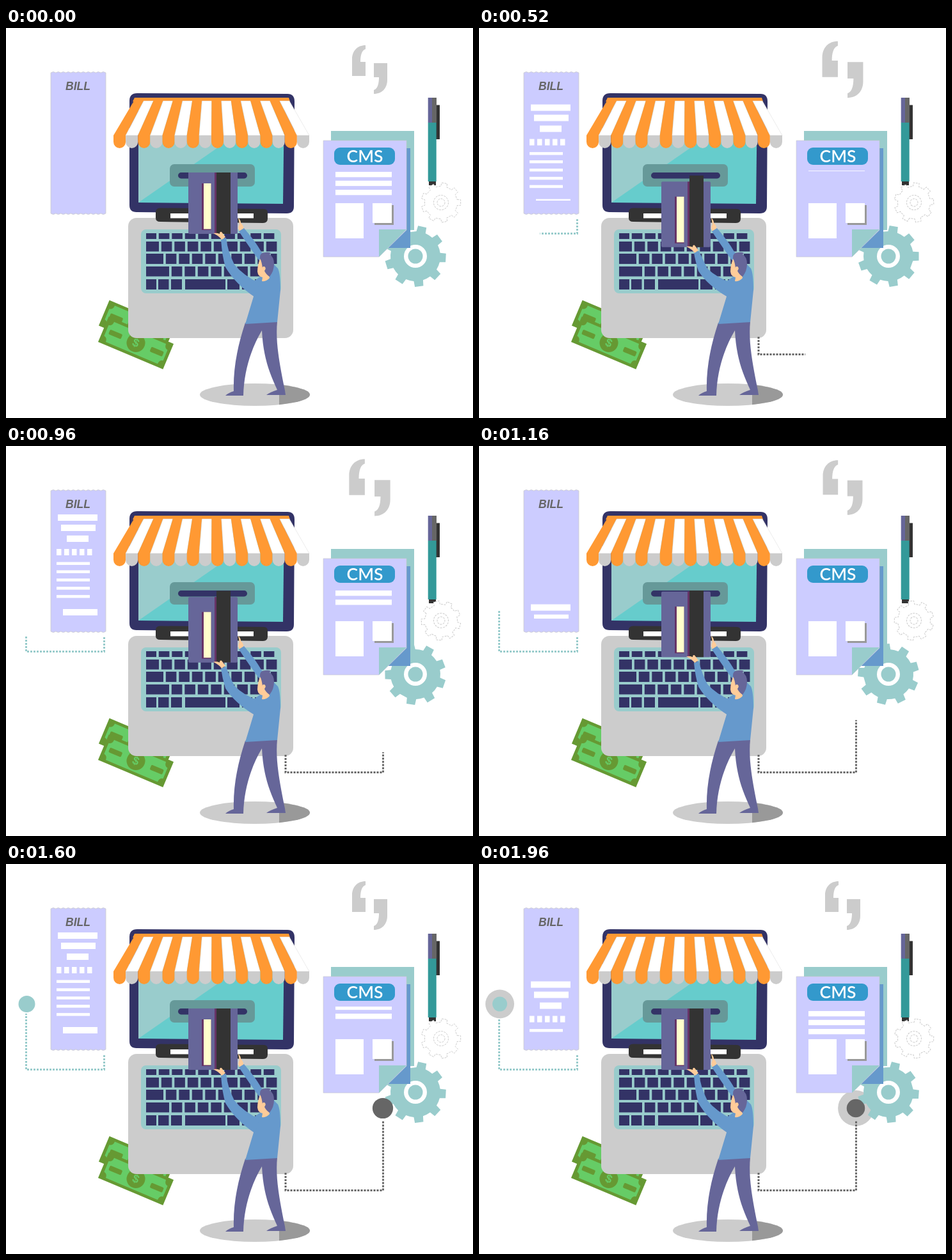
An HTML page that plays this animation: 730 by 610 pixels, repeating every 2000 ms.

```html
<!DOCTYPE html>
<html lang="en">
<head>
<meta charset="utf-8">
<title>Online shop</title>
<style>
html, body { margin: 0; width: 100%; height: 100%; overflow: hidden; background: #fff; }
svg { display: block; width: 730px; height: 610px; }
</style>
</head>
<body>
<svg viewBox="0 0 730 610">
  <defs>
    <clipPath id="billClip"><rect x="70" y="100" width="86" height="170"/></clipPath>
    <clipPath id="cmsClip"><rect x="510" y="223" width="100" height="45"/></clipPath>
    <clipPath id="slotClip"><rect x="280" y="226" width="90" height="130"/></clipPath>
    <clipPath id="shade"><rect x="427" y="550" width="60" height="50"/></clipPath>
    <g id="note">
      <rect x="-55" y="-21.5" width="110" height="43" fill="#693"/>
      <path d="M-44-17H44Q44-10 50-9V9Q44 10 44 17H-44Q-44 10-50 9V-9Q-44-10-44-17Z" fill="#6c6"/>
      <rect x="-45" y="-4" width="21" height="8" rx="2" fill="#693"/>
      <rect x="25" y="-4" width="21" height="8" rx="2" fill="#693"/>
      <circle r="14.5" fill="#693"/>
      <text y="6" text-anchor="middle" fill="#6c6" font-family="'Liberation Sans', sans-serif" font-weight="bold" font-size="18">$</text>
    </g>
    <path id="quote" d="M541 75V49C541 36 549 27 562 27V33C556 35 554 43 554 53H562V75Z"/>
  </defs>

  <g id="quotes" fill="#ccc">
    <use href="#quote"/>
    <use href="#quote" transform="rotate(180 568.5 65)"/>
  </g>

  <path id="bill" fill="#ccf" stroke="#ccc" stroke-width=".8"/>
  <text x="112.5" y="97" text-anchor="middle" fill="#666" font-family="'Liberation Sans', Arial, sans-serif" font-weight="bold" font-style="italic" font-size="17.5">BILL</text>
  <g clip-path="url(#billClip)"><g id="billRows" fill="#fff"></g></g>

  <use href="#note" transform="translate(204 467) rotate(22.8)"/>
  <use href="#note" transform="translate(203 492.5) rotate(22.8)"/>

  <!-- laptop -->
  <path d="M205 102L440 103Q451 103 451 115L450 279Q450 290 439 290L204 288Q193 288 193 277V114Q193 102 205 102Z" fill="#336"/>
  <path d="M207 115H435L433 275L207 273Z" fill="#6cc"/>
  <path d="M207 115H435L207 273Z" fill="#9cc"/>
  <rect x="256" y="213" width="133" height="35" rx="7" fill="#699"/>
  <rect x="269" y="226" width="108" height="9.5" rx="4.7" fill="#336"/>
  <rect x="191" y="297" width="258" height="188" rx="13" fill="#ccc"/>
  <path d="M241 281.5L403 283Q409 283 409 289V298Q409 305 402 305L241 303Q234 303 234 297V288Q234 281.5 241 281.5Z" fill="#333"/>
  <rect x="257" y="290" width="130" height="7.5" fill="#fff"/>
  <rect x="211" y="315" width="219" height="100" rx="8" fill="#9cc"/>
  <g id="keys" fill="#336"></g>
  <g id="awning"></g>

  <!-- document, pen and gears -->
  <circle id="haloR" cx="589" cy="382" fill="#ccc"/>
  <g id="tealGear"><path fill="#9cc"/></g>
  <circle cx="640" cy="357" r="18" fill="#fff"/>
  <circle cx="640" cy="357" r="11.5" fill="#9cc"/>
  <path d="M508 161H638V316H508Z" fill="#9cc"/>
  <path d="M620 188H632V344H598V316H620Z" fill="#69c"/>
  <path d="M496 176H626V316L583 358H496Z" fill="#ccf" stroke="#ccc" stroke-width=".6"/>
  <path d="M583 315H626L583 358Z" fill="#9cc"/>
  <rect x="513" y="187" width="95" height="27" rx="9" fill="#39c"/>
  <text x="561" y="209.5" text-anchor="middle" fill="#fff" font-family="Lato, 'Open Sans', sans-serif" font-weight="600" font-size="26.5">CMS</text>
  <g clip-path="url(#cmsClip)"><g id="cmsRows" fill="#fff">
    <rect x="515" y="230" width="88" height="8.3"/>
    <rect x="515" y="243.8" width="88" height="8.3"/>
    <rect x="515" y="258" width="88" height="8.3"/>
  </g></g>
  <rect x="515" y="274" width="44" height="55" fill="#fff"/>
  <rect x="576" y="277" width="30" height="31" fill="#999"/>
  <rect x="573" y="274" width="30" height="31" fill="#fff"/>
  <rect x="672" y="120.5" width="6" height="53.5" fill="#333"/>
  <rect x="661" y="239" width="11" height="7" fill="#333"/>
  <rect x="659.7" y="109" width="7" height="39" fill="#669"/>
  <rect x="666" y="109" width="7" height="39" fill="#666"/>
  <rect x="659.7" y="148" width="13" height="92" fill="#399"/>
  <g id="whiteGear" stroke="#ccc" stroke-width="1" stroke-dasharray="3 1.5">
    <path fill="#fff"/>
    <circle cx="680" cy="273" r="11.5" fill="none"/>
    <circle cx="680" cy="273" r="6" fill="none"/>
  </g>

  <!-- dotted connectors -->
  <g fill="none" stroke-width="3">
    <path id="lineL" d="M153.5 299V321.5H31.5V234" stroke="#9cc"/>
    <path id="lineR" d="M437 483V510.5H589.5V401" stroke="#666"/>
  </g>
  <circle id="haloL" cx="32.5" cy="219" fill="#ccc"/>
  <circle id="dotL" cx="32.5" cy="219"/>
  <circle id="dotR" cx="589" cy="382"/>

  <!-- card -->
  <g clip-path="url(#slotClip)"><g id="card">
    <rect x="285" y="219.5" width="77" height="102.5" rx="2" fill="#669"/>
    <rect x="306" y="243" width="14.5" height="73" fill="#636"/>
    <rect x="309" y="243" width="11.5" height="71.5" fill="#ffc"/>
    <rect x="326" y="219.5" width="4" height="102.5" fill="#636"/>
    <rect x="329" y="210" width="22" height="112" fill="#333"/>
  </g></g>

  <!-- person -->
  <ellipse cx="389" cy="573.5" rx="86" ry="17.5" fill="#ccc"/>
  <ellipse cx="389" cy="573.5" rx="86" ry="17.5" fill="#999" clip-path="url(#shade)"/>
  <path d="M374 461L424 459C421 490 427 523 436 567L437 574H407Q412 570 424 566C412 540 402 515 400 473C384 500 372 535 371 575H343Q347 571 356 568C355 535 361 500 374 461Z" fill="#669"/>
  <path d="M363 297Q367 300 367 305Q372 309 371 316L365 319Q362 312 365 307Z" fill="#fc9"/>
  <path d="M364 318L372 313C382 325 392 337 399 350L425 376Q429 384 429 410L424 460L374 463L387 420L386 397L400 387L396 364Q381 344 364 318Z" fill="#69c"/>
  <path id="arm" fill="#69c"/>
  <path id="hand" d="M324 321Q330 320 334 322Q334 318 337 319L343 327L337 331Q334 326 324 321Z" fill="#fc9"/>
  <path d="M397 361Q393 372 393 381Q394 389 401 390L400 396Q407 397 412 391L409 374Z" fill="#fc9"/>
  <path d="M397 360Q396 351 406 351Q410 350 414 352L412 354Q419 358 419 369Q419 380 412 389Q407 386 404 380Q407 375 404 374L401 376Q400 366 397 360Z" fill="#669"/>
  <ellipse cx="403" cy="376" rx="2.5" ry="3" fill="#fc9"/>
</svg>
<script>
const LOOP = 2000, STEP = 40, TURN = 1600;
const $ = id => document.getElementById(id);
const set = (el, attrs) => { for (const k in attrs) el.setAttribute(k, attrs[k]); };
const clamp = u => Math.max(0, Math.min(1, u));
const ramp = (t, a, b) => clamp((t - a) / (b - a));
const easeOut = u => 1 - (1 - u) ** 2;
const arch = (t, span) => Math.sin(Math.PI * ramp(t, 0, span));
const rect = (x, y, w, h) => `<rect x="${x}" y="${y}" width="${w}" height="${h}"/>`;

// piecewise linear curve through [time, value] points
function curve(points, t) {
  let [t0, v0] = points[0];
  for (const [t1, v1] of points) {
    if (t < t1) return v0 + (v1 - v0) * (t - t0) / (t1 - t0);
    [t0, v0] = [t1, v1];
  }
  return v0;
}

function gearPath(cx, cy, teeth, outer, root) {
  const pitch = 2 * Math.PI / teeth;
  const corners = [[root, -.27], [outer, -.2], [outer, .2], [root, .27]];
  let d = '';
  for (let i = 0; i < teeth; i++) {
    corners.forEach(([r, k], j) => {
      const a = (i + k) * pitch;
      const cmd = i + j === 0 ? 'M' : j === 0 ? `A${root} ${root} 0 0 1 ` : 'L';
      d += `${cmd}${(cx + r * Math.cos(a)).toFixed(2)} ${(cy + r * Math.sin(a)).toFixed(2)}`;
    });
  }
  return d + 'Z';
}

function buildBill() {
  const tooth = 86 / 11;
  const wave = dir => `q${dir * tooth / 2} ${-3 * dir} ${dir * tooth} 0`.repeat(11);
  set($('bill'), { d: `M70 70${wave(1)}V290${wave(-1)}Z` });
  const wide = [[81, 107, 62], [86, 123, 54], [95, 140, 34], [89, 255, 54]];
  let rows = wide.map(([x, y, w]) => rect(x, y, w, 10)).join('');
  for (let i = 0; i < 5; i++) {
    rows += rect(79 + 12 * i, 161, 7.5, 10);
    rows += rect(79, 181.5 + 12.9 * i, 52, 4.5);
  }
  $('billRows').innerHTML = rows;
}

function buildKeys() {
  const rows = [[321, 9, 16], [334, 15.5, 20], [353, 16, 27], [373, 15.5, 36]];
  let keys = '';
  for (const [y, h, first] of rows) {
    keys += rect(219, y, first, h);
    for (let x = 222.8 + first; x < 418; x += 20.5) keys += rect(x, y, Math.min(16.6, 423.5 - x), h);
  }
  for (const [x, w] of [[219, 16], [238, 16.5], [258, 17], [280, 63], [346, 19], [369, 16], [389, 16], [408, 15]])
    keys += rect(x, 393, w, 16);
  $('keys').innerHTML = keys;
}

function buildAwning() {
  const top = 243 / 16, low = 306 / 16;
  let out = '<path d="M201 109H442L444 115H198Z" fill="#f93"/>';
  for (let i = 0; i < 16; i++) {
    const a = 200 + top * i, b = 168 + low * i, white = i % 2;
    out += `<path d="M${a} 114h${top}L${b + low} 168h${-low}Z" fill="${white ? '#fff' : '#f93'}"${white ? ' stroke="#ccc" stroke-width=".4"' : ''}/>`;
    out += `<path d="M${b} 168h${low}v10a${low / 2} 10 0 0 1 ${-low} 0Z" fill="${white ? '#ccc' : '#f93'}"/>`;
  }
  $('awning').innerHTML = out;
}

function drawLine(el, part) {
  const shown = part * el.getTotalLength();
  let dashes = '';
  for (let s = 0; s < shown; s += 5) dashes += `${Math.min(3, shown - s)} ${s + 5 < shown ? 2 : 999} `;
  set(el, { 'stroke-dasharray': dashes || '0 999' });
}

function drawNode(side, t, size, early, late) {
  const pop = curve([[1290, 0], [1360, 8.5], [1520, 13], [1620, 13], [1800, 11.5]], t);
  const halo = t < 1620 ? 0 : 11.5 + 11 * easeOut(ramp(t, 1620, 1920));
  set($('dot' + side), { r: pop * size, fill: t < 1440 ? early : late });
  set($('halo' + side), { r: halo * size });
}

// the receipt prints three times, the last one cut short by the loop
function billOffset(t) {
  const start = t < 1040 ? 0 : t < 1640 ? 1040 : 1640;
  return Math.max(0, 179 - .32 * (t - start));
}

const cmsScroll = [[0, 0], [85, 0], [370, -44], [400, -44], [440, -5], [470, 0], [600, 0]];

function draw(t) {
  const s = 1 + .185 * arch(t, 1520);
  set($('quotes'), { transform: `translate(568.5 65) scale(${s}) translate(-568.5 -65)` });

  const dy = 22 * arch(t, 1320);
  set($('card'), { transform: `translate(0 ${dy})` });
  set($('hand'), { transform: `translate(0 ${dy})` });
  const e = dy * .3;
  set($('arm'), { d: `M336 ${331 + dy}L344 ${328 + dy}Q346 ${348 + e} 357 ${370 + e}Q371 ${387 + e * .5} 396 399L389 421Q358 ${400 + e * .5} 343 ${374 + e}Q338 ${358 + e} 336 ${331 + dy}Z` });

  set($('billRows'), { transform: `translate(0 ${billOffset(t)})` });
  set($('cmsRows'), { transform: `translate(0 ${curve(cmsScroll, (t + 440) % 600)})` });

  const angle = 360 * t / TURN;
  set($('tealGear'), { transform: `rotate(${angle - 77} 640 357)` });
  set($('whiteGear'), { transform: `rotate(${angle} 680 273)` });

  const part = ramp(t, 120, 1270);
  drawLine($('lineL'), part);
  drawLine($('lineR'), part);
  drawNode('L', t, 1, '#ccc', '#9cc');
  drawNode('R', t, 1.24, '#999', '#666');
}

buildBill();
buildKeys();
buildAwning();
set($('tealGear').firstElementChild, { d: gearPath(640, 357, 9, 48, 39) });
set($('whiteGear').firstElementChild, { d: gearPath(680, 273, 9, 31, 25.5) });

const begin = performance.now();
function tick(now) {
  const t = Math.max(0, now - begin) % LOOP;
  draw(Math.floor(t / STEP) * STEP);
  requestAnimationFrame(tick);
}
draw(0);
requestAnimationFrame(tick);
</script>
</body>
</html>
```
